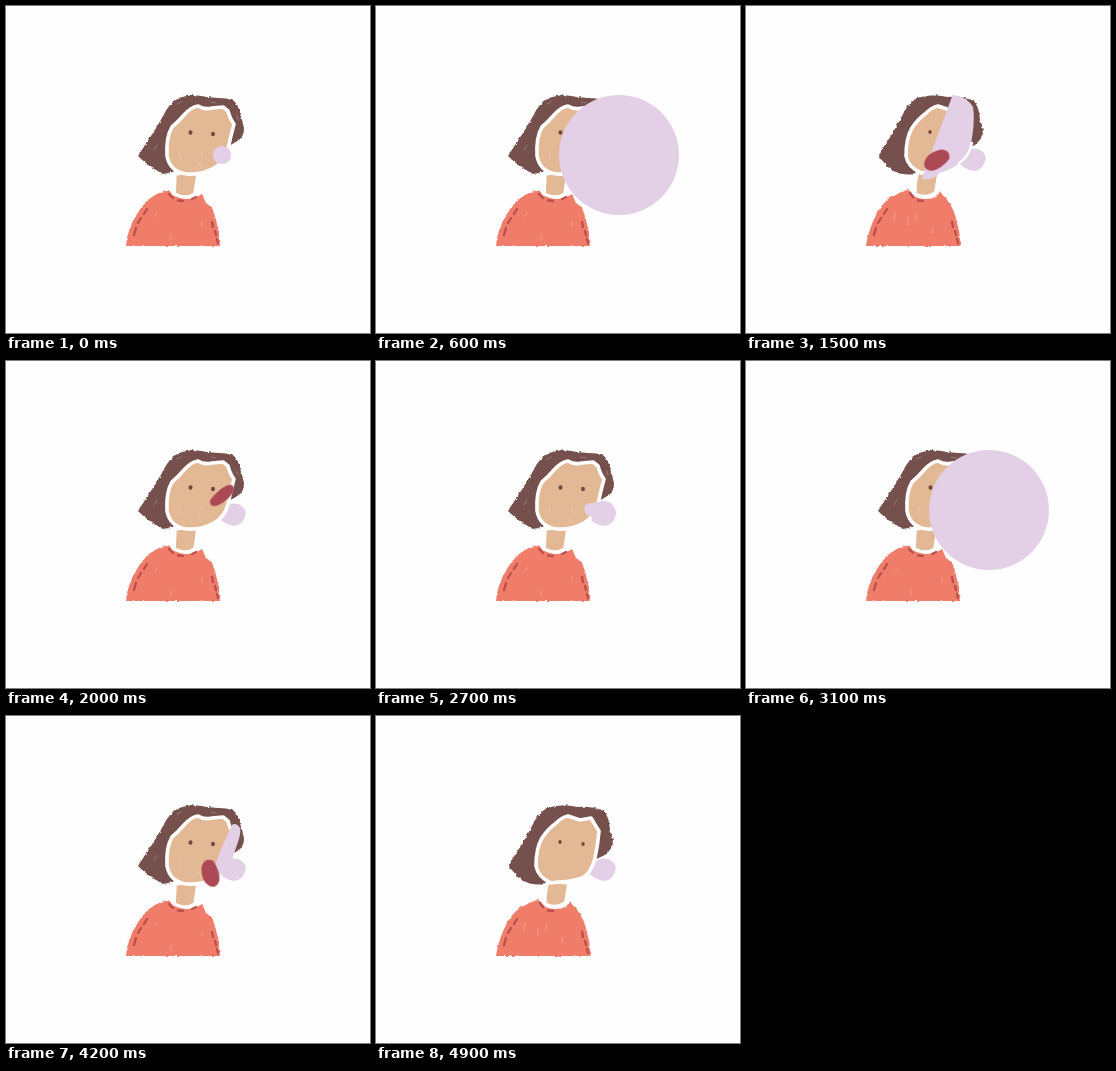
Write an HTML page without scripts that moves like this. It is 364x327 px and loops after 5 s.

```html
<!DOCTYPE html>
<html lang="en">
<head>
<meta charset="utf-8">
<title>Bubble gum</title>
<style>
html, body { margin: 0; width: 100%; height: 100%; overflow: hidden; background: #fefefe; }
svg { display: block; width: 100vw; height: 100vh; }

.shirt { fill: #ef7d6a; }
.stitch { fill: none; stroke: #bd504c; stroke-width: 2.4; stroke-linecap: round; }
.skin { fill: #e2b895; stroke: #fefefe; stroke-width: 3.6; stroke-linejoin: round; }
.hair { fill: #75504c; }
.eye { fill: #75473e; }
.streak { fill: none; stroke: #fff; stroke-opacity: .25; stroke-linecap: round; }
.gum { fill: #e3d0e6; }
.tongue { fill: #ac4954; }
.chalk-a { filter: url(#chalkA); }
.chalk-b { filter: url(#chalkB); }

/* One blow, pop and lick takes 25 drawings of 100 ms */
.anim { animation: 2.5s step-end infinite; }
.pose-a { animation-name: poseA; }
.pose-b { animation-name: poseB; }
.rest { animation-name: rest; }
.bubble { animation-name: blow; }
.stem { animation-name: stem; }
.mask { animation-name: mask; }
.wipe { animation-name: wipe; }
.strip { animation-name: strip; transform-origin: 231px 112px; }
.tongue { animation-name: lick; }

@keyframes poseA {
  0%, 24%, 52%, 68% { visibility: visible; }
  12%, 36%, 60%, 92% { visibility: hidden; }
}
@keyframes poseB {
  0%, 24%, 52%, 68% { visibility: hidden; }
  12%, 36%, 60%, 92% { visibility: visible; }
}
@keyframes rest {
  0% { visibility: hidden; }
  8%, 100% { visibility: visible; }
}
@keyframes blow {
  0% { transform: translate(216px, 149px) scale(9.2); }
  4% { transform: translate(221px, 150px) scale(10.5); }
  8% { transform: translate(227.5px, 152px) scale(12.2); }
  12% { transform: translate(233px, 151px) scale(22); }
  16% { transform: translate(238px, 150px) scale(34); }
  20% { transform: translate(241px, 149px) scale(47); }
  24% { transform: translate(243px, 149px) scale(60); }
  28% { transform: translate(239px, 149px) scale(78); }
  32% { transform: translate(233px, 149px) scale(94); }
  36% { transform: translate(227px, 149px) scale(106); }
  40%, 100% { transform: scale(0); }
}
@keyframes stem {
  0%, 40% { visibility: hidden; }
  4% { visibility: visible; }
}
@keyframes mask {
  0%, 68% { visibility: hidden; }
  40% { visibility: visible; }
}
@keyframes wipe {
  0% { transform: none; }
  52% { transform: translateX(16px); }
  56% { transform: translateX(30px); }
  60% { transform: translateX(46px); }
  64% { transform: translateX(62px); }
  68%, 100% { transform: translateX(80px); }
}
@keyframes strip {
  0% { visibility: hidden; }
  68% { visibility: visible; transform: none; }
  72% { visibility: visible; transform: scale(.6); }
  76%, 100% { visibility: hidden; }
}
@keyframes lick {
  0% { transform: scale(0); }
  48% { transform: translate(203px, 146px) rotate(140deg) scale(.6); }
  52% { transform: translate(203px, 146px) rotate(120deg); }
  56% { transform: translate(202px, 146px) rotate(90deg); }
  60% { transform: translate(201px, 146px) rotate(55deg); }
  64% { transform: translate(200px, 145px) rotate(20deg); }
  68% { transform: translate(200px, 145px) rotate(-17deg); }
  72% { transform: translate(201px, 146px) rotate(-55deg); }
  76% { transform: translate(203px, 146px) rotate(-95deg); }
  80% { transform: translate(206px, 144px) rotate(-131deg) scale(.72, 1.05); }
  84% { transform: translate(206px, 144px) rotate(-131deg) scale(.5); }
  88%, 100% { transform: scale(0); }
}
</style>
</head>
<body>
<svg viewBox="0 0 364 327" preserveAspectRatio="none">
  <defs>
    <filter id="chalkA" color-interpolation-filters="sRGB">
      <feTurbulence type="fractalNoise" baseFrequency=".35" numOctaves="2" seed="4" result="n"/>
      <feDisplacementMap in="SourceGraphic" in2="n" scale="3" xChannelSelector="R" yChannelSelector="G"/>
    </filter>
    <filter id="chalkB" color-interpolation-filters="sRGB">
      <feTurbulence type="fractalNoise" baseFrequency=".3" numOctaves="2" seed="9" result="n"/>
      <feDisplacementMap in="SourceGraphic" in2="n" scale="3" xChannelSelector="R" yChannelSelector="G"/>
    </filter>
    <clipPath id="left">
      <path class="anim wipe" d="M164 80H300V180H127Z"/>
    </clipPath>
  </defs>

  <path class="gum rest anim" d="M214 152Q217 145 226 142.500Q238 142 240 152Q238 164 228 165Q219 164 212 156Z"/>

  <g class="pose-a anim">
    <g class="chalk-a">
      <path class="shirt" d="M120 240Q121 224 131 208Q140 192 153 187L162 184Q169 191 179 193Q189 193 196 188L200 197L206 201Q213 220 214 240Z"/>
      <path class="hair" d="M132 150L141 136Q151 121 157 110Q163 97 173 92Q186 87 200 91L226 93Q233 99 235 110L238 122Q238 130 233 134L223 140L166 166L157 168Q143 161 132 150Z"/>
    </g>
    <path class="stitch" d="M163 188l4 4M172 194.500l5 .5M186 193l4-2M141 203l-3 5M135 212l-3 5M130 222l-2 7M206 216l1 5M209 225l1 4M211 233l1 4"/>
    <path class="skin" d="M169 168Q180 166 192 168L189 188Q180 194 168 188Z"/>
    <path class="skin" d="M161 150Q160 131 166 121Q172 116 178 109Q185 101 192 100Q198 104 206 102L217 101L222 105Q224 113 228 118Q225 129 222 143Q219 156 208 162Q195 169 181 168Q164 166 161 150Z"/>
    <ellipse class="eye" cx="184.500" cy="126.500" rx="2" ry="2.300"/>
    <ellipse class="eye" cx="207" cy="128" rx="2" ry="2.300"/>
    <path class="streak" d="M173 146l1 6M196 146v4M193 156l2 5M149 210l2-3M165 229v5M196 216v4M148 144l3-5M171 98l4-2M205 96l5 1M231 110l1 4"/>
  </g>

  <g class="pose-b anim">
    <g class="chalk-b">
      <path class="shirt" d="M120 240Q122 224 131 207Q140 191 153 187L163 183Q167 193 180 193Q190 193 194 186Q206 197 210 212Q214 226 215 240Z"/>
      <path class="hair" d="M133 151Q135 144 141 136Q150 122 156 110Q161 98 171 92Q187 87 201 91Q215 90 228 95Q233 101 234 113L237 124Q236 134 229 139L218 144L170 168Q155 170 146 164Q138 157 133 151Z"/>
    </g>
    <path class="stitch" d="M164 187l3 4M172 194.500l5 .5M141 203l-3 5M135 212l-3 5M130 222l-2 7M206 216l1 5M209 225l1 4M211 233l1 4"/>
    <path class="skin" d="M172 165L193 167L190 186Q181 194 169 188Q168 177 172 165Z"/>
    <path class="skin" d="M160 150Q160 132 166 122Q172 113 179 108Q186 101 192 100L204 104L215 102Q219 109 223 115Q222 128 219 142Q215 158 206 162Q194 166 182 166L175 167Q162 161 160 150Z"/>
    <ellipse class="eye" cx="184" cy="126" rx="1.700" ry="2"/>
    <ellipse class="eye" cx="207" cy="128" rx="1.700" ry="2"/>
    <path class="streak" d="M149 207l-1 8M162 212v7M171 208l-1 7M187 222l-1 5"/>
  </g>

  <g clip-path="url(#left)">
    <path class="gum mask anim" d="M190 94Q198 88 208 89Q221 91 227 101Q229 115 226 132Q224 149 215 155Q208 163 193 167Q190 174 176 173Q163 174 158 166Q151 160 153 153Q161 145 163 135Q160 122 166 111Q170 106 182 104Q186 99 190 94Z"/>
    <path class="mask anim" fill="none" stroke="#fefefe" stroke-width="2.500" stroke-linecap="round" d="M226 137Q223 151 213 157"/>
  </g>
  <path class="gum strip anim" d="M226 109Q230 106 234 112Q235 118 232 126Q226 143 224 152Q219 158 211 159L207 156Q213 136 226 109Z"/>

  <path class="tongue anim" d="M-2 0Q3-2 7 2Q10 12 8 20Q6 27 0 27Q-7 25-8 16Q-8 4-2 0Z"/>

  <path class="gum stem anim" d="M208 148Q209 141 217 142L229 140V164Q219 162 216 156Q209 155 208 148Z"/>
  <circle class="gum bubble anim" r="1"/>
</svg>
</body>
</html>
```
